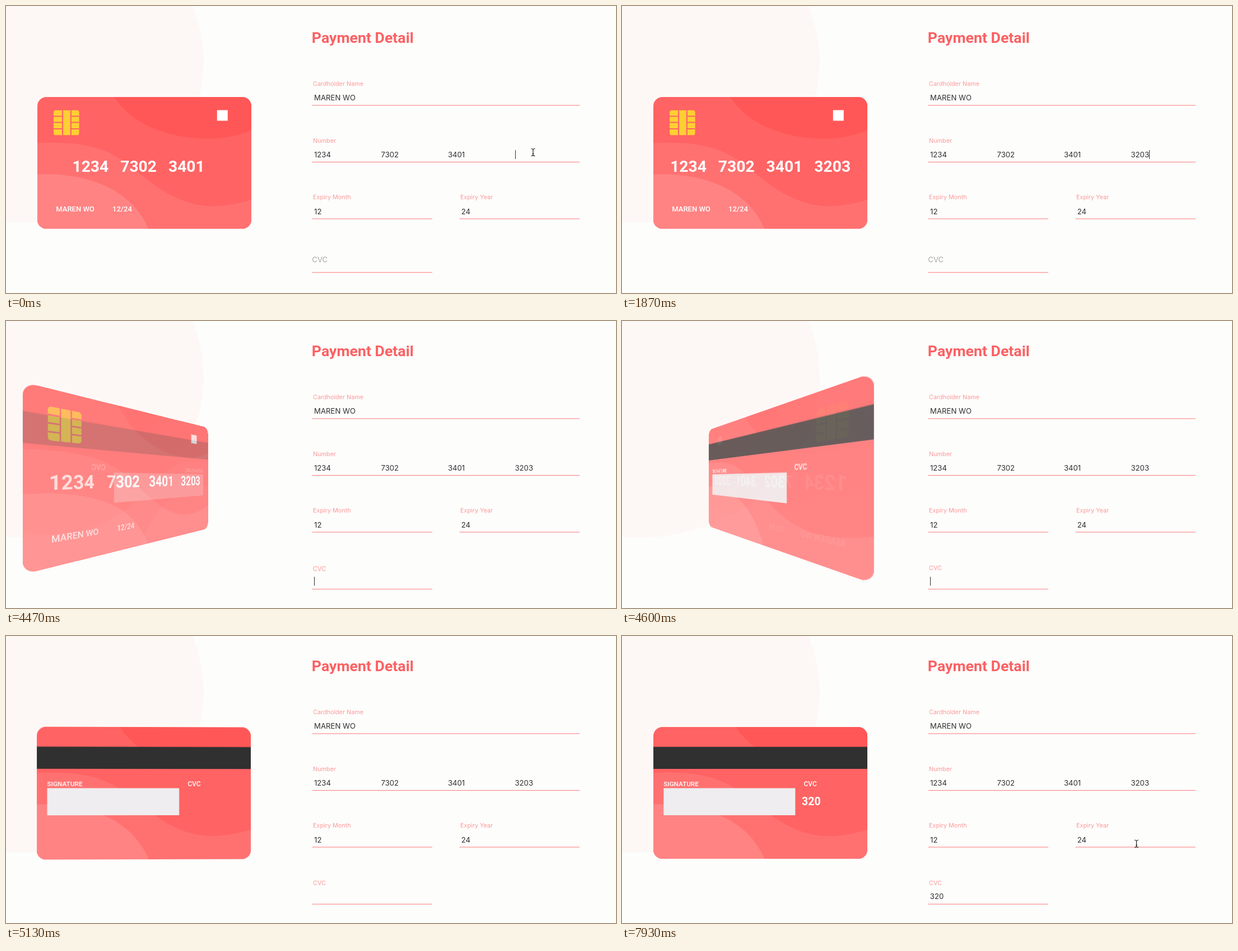
Recreate the animation shown at these times as an HTML page. Size 1089 by 514 pixels, loop 8 s.

```html
<!DOCTYPE html>
<html lang="en">
<head>
<meta charset="utf-8">
<title>Payment Detail</title>
<style>
html, body { margin: 0; width: 100%; height: 100%; overflow: hidden; background: #fdfdfc; }
#stage { position: absolute; left: 0; top: 0; width: 1089px; height: 514px; overflow: hidden; }
svg { position: absolute; left: 0; top: 0; display: block; }
text { white-space: pre; }
.face {
  position: absolute; left: 56.2px; top: 162.5px; width: 382px; height: 236.5px;
  border-radius: 16px; overflow: hidden; background: #ff6363;
}
.face text { font-family: Roboto, sans-serif; font-weight: 500; fill: #fff; }
.face .bold { font-weight: 700; }
#title { font: 700 26.7px Roboto, sans-serif; fill: #fb6163; }
.label { font: 400 10.8px Inter, sans-serif; fill: #fa9a99; }
.value { font: 400 13.2px Inter, sans-serif; fill: #303033; }
.line { fill: #fa7a7a; }
</style>
</head>
<body>
<div id="stage">
  <svg width="1089" height="514">
    <defs>
      <path id="top" fill="#ff5757" d="M193 162C225 212 290 237 362 237C395 237 420 230 440 221V162Z"/>
      <g id="waves">
        <path fill="#ff7171" d="M56 245C150 240 190 258 235 297C285 338 325 359 372 358C400 357 420 352 440 346V400H56Z"/>
        <path fill="#ff8383" d="M56 301C140 297 225 325 255 400H56Z"/>
      </g>
      <clipPath id="chipClip"><rect x="85" y="186" width="46" height="45" rx="4.5"/></clipPath>
    </defs>
    <ellipse cx="30" cy="100" rx="323" ry="288" fill="#fdf8f6"/>
  </svg>

  <div class="face" id="front">
    <svg width="382" height="236.5" viewBox="56.2 162.5 382 236.5">
      <use href="#top"/><use href="#waves"/>
      <g clip-path="url(#chipClip)">
        <rect x="85" y="186" width="46" height="45" fill="#ffcf33"/>
        <path stroke="#ff6464" stroke-width="2.2" d="M101.2 186V231M116 186V231M85 197H101M85 208H101M85 219.5H101M116 197H131M116 208H131M116 219.5H131"/>
      </g>
      <rect x="377" y="186" width="19" height="19" fill="#fff"/>
      <text class="bold" id="cardNumber" x="247.3" y="296.3" font-size="28.2" text-anchor="middle"></text>
      <text x="89.5" y="367" font-size="13">MAREN WO</text>
      <text x="190.3" y="367" font-size="13">12/24</text>
    </svg>
  </div>

  <div class="face" id="back">
    <svg width="382" height="236.5" viewBox="56.2 162.5 382 236.5">
      <use href="#top" x="10"/><use href="#waves"/>
      <rect x="56" y="198" width="383" height="39.5" fill="#303030"/>
      <rect x="74.5" y="272" width="235" height="48.5" fill="#efedef"/>
      <text x="74.5" y="268.5" font-size="11.7">SIGNATURE</text>
      <text x="324.7" y="268.5" font-size="12">CVC</text>
      <text class="bold" id="cardCvc" x="321.3" y="302.7" font-size="19.5"></text>
    </svg>
  </div>

  <svg width="1089" height="514">
    <g id="form">
      <text id="title" x="545.8" y="66">Payment Detail</text>
      <rect id="picked" y="360" width="16.5" height="16" fill="#f4c3d2"/>
    </g>
    <rect class="line" id="cvcLine" x="546.5" width="214.5" height="1"/>
    <text class="label" id="cvcLabel">CVC</text>
    <text class="value" id="cvc" x="549.8" y="471.3"></text>
    <rect id="caret" width="1" height="16" fill="#303033"/>
    <path id="beam" fill="none" stroke="#222" stroke-width="1.2" d="M-3.5-6.5Q0-6.5 0-4.5V4.5Q0 6.5-3.5 6.5M3.5-6.5Q0-6.5 0-4.5V4.5Q0 6.5 3.5 6.5M-1.5 2.5H1.5"/>
    <path id="arrow" fill="#111" stroke="#fff" stroke-width="1" d="M0 0V14L3.3 11L5.5 16L7.8 15L5.6 10.2H10Z"/>
  </svg>
</div>

<script>
const $ = id => document.getElementById(id);
const form = $('form');

function add(tag, cls, attrs, text = '') {
  const el = document.createElementNS('http://www.w3.org/2000/svg', tag);
  el.setAttribute('class', cls);
  for (const k in attrs) el.setAttribute(k, attrs[k]);
  el.textContent = text;
  form.append(el);
  return el;
}
const setAttrs = (el, attrs) => { for (const k in attrs) el.setAttribute(k, attrs[k]); };
const show = (el, on) => { el.style.display = on ? '' : 'none'; };
const clamp = v => Math.min(1, Math.max(0, v));
const mix = (a, b, p) => a + (b - a) * p;

// label, left, underline y, width
for (const [name, x, y, w] of [
  ['Cardholder Name', 546.5, 177.4, 477.5],
  ['Number', 546.5, 279, 477.5],
  ['Expiry Month', 546.5, 380.6, 214.5],
  ['Expiry Year', 809.5, 380.6, 214.5],
]) {
  add('text', 'label', { x: x + 1.6, y: y - 34.4 }, name);
  add('rect', 'line', { x, y, width: w, height: 1 });
}
const value = (x, y, text) => add('text', 'value', { x, y }, text);
value(550, 169, 'MAREN WO');
['1234', '7302', '3401'].forEach((s, i) => value(549.9 + i * 119.5, 270.8, s));
const lastGroup = value(908.4, 270.8, '');
value(550.1, 372.8, '12');
value(812.7, 372.8, '24');

const digitTimes = [1130, 1400, 1670, 1870];
const cvcTimes = [5270, 5470, 6070];
const caretOn = [[0, 530], [1000, 2270], [4400, 4900], [5270, 5930], [6070, 6530], [7070, 7530]];
const mouse = [[7070, 940, 262], [7400, 1026, 86], [7660, 968, 292], [7930, 918.5, 372]];
const typed = (text, times, t) => text.slice(0, times.filter(k => t >= k).length);

// damped spring, 0 to 1
function spring(s) {
  if (s <= 0) return 0;
  if (s > .82) return 1;
  return 1 - Math.exp(-8 * s) * (Math.cos(6 * s) + 8 / 6 * Math.sin(6 * s));
}

function turn(el, deg, opacity) {
  show(el, opacity > 0);
  el.style.opacity = opacity;
  el.style.transform = deg ? `perspective(381px) rotateY(${deg}deg)` : 'none';
}

function mouseAt(t) {
  if (t < 1130) return [941, 262];
  if (t < 7070) return null;
  let i = 1;
  while (i < mouse.length - 1 && t > mouse[i][0]) i++;
  const [ta, xa, ya] = mouse[i - 1], [tb, xb, yb] = mouse[i];
  const p = clamp((t - ta) / (tb - ta)), e = p * p * (3 - 2 * p);
  return [mix(xa, xb, e), mix(ya, yb, e)];
}

function draw(ms) {
  // 15 pictures a second
  const t = Math.floor((ms + 4) * .015) / .015 + 5;
  const onCvc = t >= 4400;

  const flip = spring((t - 5 - 4387) / 975);
  const fade = clamp(flip);
  turn($('front'), flip * 180, 1 - fade);
  turn($('back'), flip === 1 ? 0 : flip * 180 - 180, fade);

  form.setAttribute('transform', `translate(0 ${onCvc ? -3 : 0})`);
  const digits = typed('3203', digitTimes, t);
  const code = typed('320', cvcTimes, t);
  lastGroup.textContent = digits;
  $('cardNumber').textContent = '1234   7302   3401   ' + digits;
  $('cvc').textContent = $('cardCvc').textContent = code;

  show($('picked'), t >= 2270 && !onCvc);
  $('picked').setAttribute('x', t < 3330 ? 549.5 : 812.5);

  const p = 1 - Math.pow(1 - clamp((t - 5 - 4383) / 200), 3.4);
  const label = $('cvcLabel');
  setAttrs(label, { x: mix(546.3, 548, p), y: mix(458.8, 445.5, p) });
  label.style.fontSize = mix(13.2, 10.8, p) + 'px';
  label.style.fill = onCvc ? '#fa9a99' : '#aaa99f';
  $('cvcLine').setAttribute('y', onCvc ? 479.7 : 476.7);

  const caret = $('caret');
  show(caret, caretOn.some(([a, b]) => t >= a && t < b));
  const width = el => el.textContent ? el.getComputedTextLength() : 0;
  setAttrs(caret, onCvc
    ? { x: Math.round(550 + width($('cvc'))), y: 458 }
    : { x: Math.round(908.5 + width(lastGroup)), y: 258 });

  const m = mouseAt(t);
  const overField = m && [[250, 279], [352, 381]].some(([a, b]) => m[1] > a && m[1] < b) && m[0] < 1024;
  show($('beam'), m && overField);
  show($('arrow'), m && !overField);
  if (m) for (const id of ['beam', 'arrow']) $(id).setAttribute('transform', `translate(${m[0]} ${m[1]})`);
}

const start = performance.now();
function tick() {
  draw((performance.now() - start) % 8000);
  requestAnimationFrame(tick);
}
tick();
</script>
</body>
</html>
```
